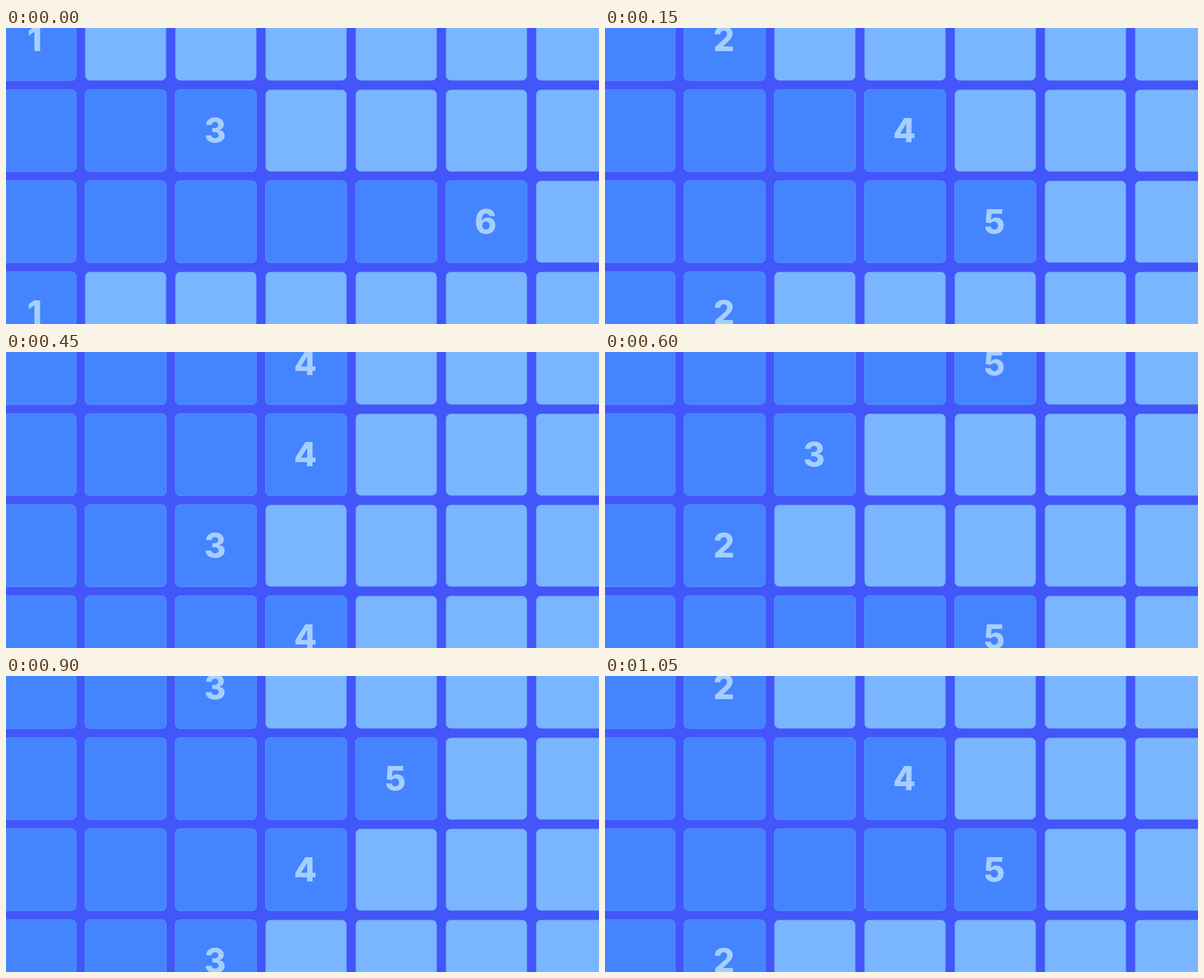
Recreate the animation shown at these times as an HTML page. Size 1000 by 500 pixels, loop 1.2 s.

```html
<!DOCTYPE html>
<html lang="en">
<head>
<meta charset="utf-8">
<title>Counting rows</title>
<style>
  html, body { margin: 0; width: 100%; height: 100%; overflow: hidden; background: #4356f9; }
  svg { display: block; width: 1000px; height: 500px; }
  .empty { fill: #79b6ff; stroke: #6a9dfd; stroke-width: .7; }
  .full { fill: #4485ff; stroke: #5794ff; stroke-width: 1; }
  text { font: 800 56px Inter, sans-serif; fill: #a5cfff; text-anchor: middle; }
</style>
</head>
<body>
<svg id="stage" viewBox="0 0 1000 500"></svg>
<script>
const STEP = 150;
const COLS = 7;
const PITCH = { x: 152.1, y: 153.8 };
const SIZE = { w: 137.4, h: 138.8 };
const ORIGIN = { x: -19, y: -49.8 };

// Filled cells per row, one value per step; the last row repeats the first.
const counts = [
  [1, 2, 3, 4, 5, 4, 3, 2],
  [3, 4, 5, 4, 3, 4, 5, 4],
  [6, 5, 4, 3, 2, 3, 4, 5],
];
counts.push(counts[0]);

const stage = document.getElementById('stage');

function add(tag, attrs) {
  const el = document.createElementNS('http://www.w3.org/2000/svg', tag);
  for (const key in attrs) el.setAttribute(key, attrs[key]);
  return stage.appendChild(el);
}

function addCell(col, row, type, inset) {
  return add('rect', {
    class: type,
    x: ORIGIN.x + col * PITCH.x + inset,
    y: ORIGIN.y + row * PITCH.y + inset,
    width: SIZE.w - 2 * inset,
    height: SIZE.h - 2 * inset,
    rx: 8,
  });
}

const rows = counts.map((values, row) => {
  const cells = [];
  for (let col = 0; col < COLS; col++) {
    cells.push({
      empty: addCell(col, row, 'empty', 0.6),
      full: addCell(col, row, 'full', 0.1),
    });
  }
  const label = add('text', { y: 39.1 + row * PITCH.y });
  return { values, cells, label };
});

function show(step) {
  for (const { values, cells, label } of rows) {
    const n = values[step];
    cells.forEach(({ empty, full }, col) => {
      empty.style.display = col < n ? 'none' : '';
      full.style.display = col < n ? '' : 'none';
    });
    label.textContent = n;
    label.setAttribute('x', ORIGIN.x + (n - 1) * PITCH.x + SIZE.w / 2 - 1.3);
  }
}

const start = performance.now();
let current = 0;
show(current);

function tick() {
  const step = Math.floor((performance.now() - start) / STEP) % counts[0].length;
  if (step !== current) show(current = step);
  requestAnimationFrame(tick);
}
requestAnimationFrame(tick);
</script>
</body>
</html>
```
